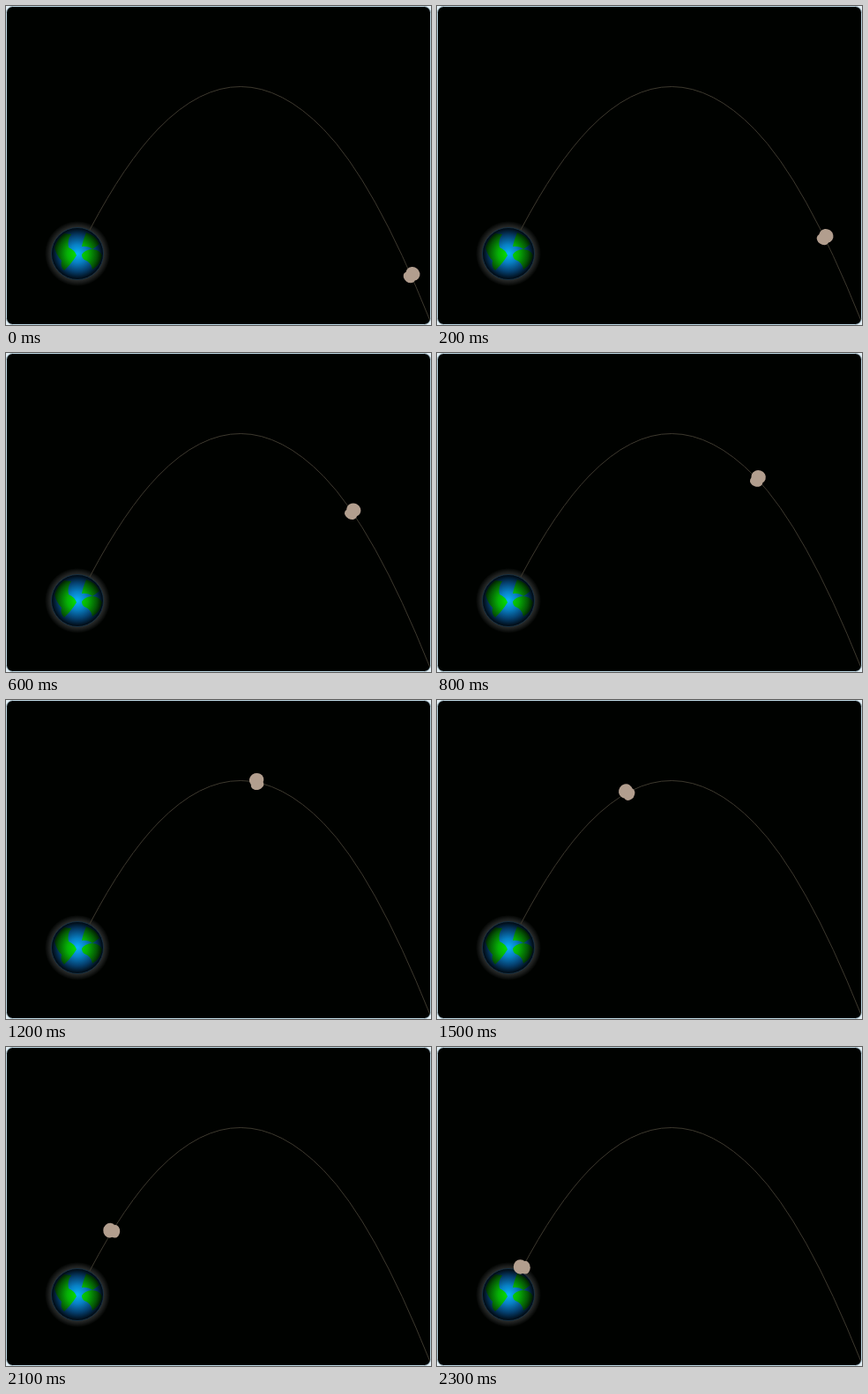
An HTML page for the animation above (2400 ms loop, 482x362 px).

```html
<!DOCTYPE html>
<html lang="en">
<head>
<meta charset="utf-8">
<title>Moon on a curved path</title>
<style>
  html, body { margin: 0; width: 100%; height: 100%; overflow: hidden; background: #e4eff5; }
  svg { display: block; width: 482px; height: 362px; }
</style>
</head>
<body>
<svg viewBox="0 0 482 362">
  <defs>
    <radialGradient id="sea">
      <stop offset="0" stop-color="#08b4fa"/>
      <stop offset=".35" stop-color="#0880c4"/>
      <stop offset=".7" stop-color="#053e6c"/>
      <stop offset="1" stop-color="#00060c"/>
    </radialGradient>
    <radialGradient id="land" gradientUnits="userSpaceOnUse" cx="81" cy="281" r="29.5">
      <stop offset="0" stop-color="#06e406"/>
      <stop offset=".4" stop-color="#06ae06"/>
      <stop offset=".75" stop-color="#045604"/>
      <stop offset="1" stop-color="#000800"/>
    </radialGradient>
    <radialGradient id="glow">
      <stop offset=".78" stop-color="#2e302f"/>
      <stop offset=".88" stop-color="#1a1c1b"/>
      <stop offset="1" stop-color="#000200"/>
    </radialGradient>
    <clipPath id="disc"><circle cx="81" cy="281" r="29"/></clipPath>
  </defs>
  <rect x=".5" y=".5" width="481" height="361" rx="7" fill="#000200" stroke="#bcd6e2"/>
  <circle cx="81" cy="281" r="37" fill="url(#glow)"/>
  <path id="orbit" d="M480.5 356Q417.5 198.8 360.3 140Q266 43.5 173 139Q134.8 178.3 95 254" fill="none" stroke="#3d392e"/>
  <circle cx="81" cy="281" r="29.5" fill="url(#sea)" stroke="#16344a" stroke-width=".8"/>
  <g fill="url(#land)" clip-path="url(#disc)">
    <path d="M66 258L74 259Q69 266 71 274Q78 277 80 283Q77 288 72 294L66 300Q61 296 63 289Q57 283 55 274Q58 264 66 258Z"/>
    <path d="M91 257Q102 260 106 270Q101 274 98 276Q93 272 86 273Q87 267 91 257Z"/>
    <path d="M86 282Q89 277 97 276Q106 276 109 283Q107 294 98 299Q97 291 89 288Q86 286 86 282Z"/>
  </g>
  <g id="moon" fill="#b29e8e">
    <ellipse cx="-1.8" rx="7.7" ry="8.3"/>
    <ellipse cx="3.8" cy=".7" rx="5.7" ry="7.4"/>
  </g>
</svg>
<script>
  const LOOP = 2400, STEP = 100;
  const FIRST = 54.5, STRIDE = 23.7; // pixels along the orbit
  const OUTWARD = 1;                 // moon centre lies just outside the line
  const moon = document.getElementById('moon');
  const orbit = document.getElementById('orbit');

  function draw(ms) {
    const step = Math.floor((ms % LOOP) / STEP);
    const along = FIRST + step * STRIDE;
    const p = orbit.getPointAtLength(along);
    const a = orbit.getPointAtLength(along - 2);
    const b = orbit.getPointAtLength(along + 2);
    const angle = Math.atan2(a.y - b.y, a.x - b.x);
    const x = p.x + OUTWARD * Math.sin(angle);
    const y = p.y - OUTWARD * Math.cos(angle);
    const turn = angle * 180 / Math.PI + 62;
    moon.setAttribute('transform', `translate(${x} ${y}) rotate(${turn})`);
  }

  const start = performance.now();
  function tick() {
    draw(performance.now() - start);
    requestAnimationFrame(tick);
  }
  tick();
</script>
</body>
</html>
```
